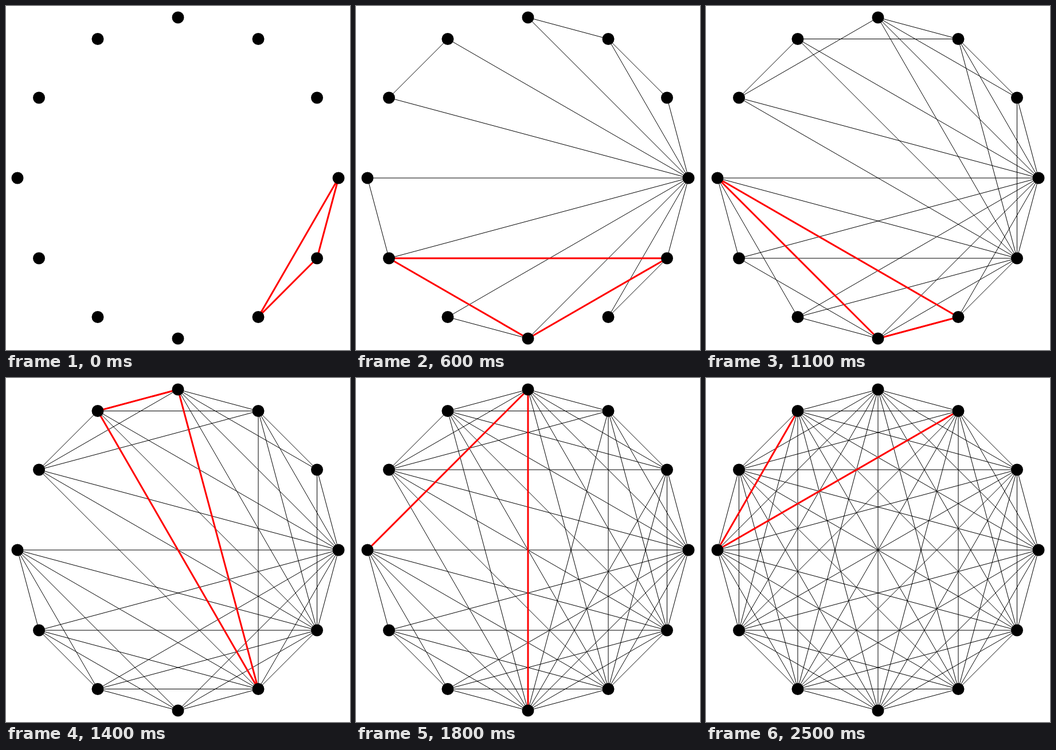
Animation, 600 px wide and 600 px high, one loop 2.6 s. Source, as an HTML page:

```html
<!DOCTYPE html>
<html lang="en">
<head>
<meta charset="utf-8">
<title>Covering the complete graph on twelve points</title>
<style>
  html, body { margin: 0; width: 100%; height: 100%; overflow: hidden; background: #fff; }
  svg { display: block; width: 100%; height: 100%; }
  path { fill: none; }
  #drawn { stroke: #000; stroke-width: 1; }
  #fresh { stroke: #f00; stroke-width: 3; }
</style>
</head>
<body>
<svg viewBox="0 0 600 600">
  <path id="drawn"/>
  <path id="fresh"/>
  <g id="dots"></g>
</svg>
<script>
const STEP = 100;
const COUNT = 12;
// Each step joins three points, written as base-12 digits.
const triples = ('012 034 056 078 09a 0ab 135 146 179 18a 19b 236 245 ' +
  '27a 289 28b 37b 38a 369 47b 48a 459 57b 58a 67b 68a').split(' ');

const points = Array.from({ length: COUNT }, (_, i) => {
  const angle = i * 2 * Math.PI / COUNT;
  return [300 + 280 * Math.cos(angle), 300 + 280 * Math.sin(angle)];
});

const segment = ([a, b]) => `M${points[a]}L${points[b]}`;

// Only edges not drawn before belong to a step.
const seen = new Set();
const steps = triples.map(triple => {
  const [a, b, c] = [...triple].map(d => parseInt(d, COUNT));
  return [[a, b], [b, c], [a, c]].filter(edge => {
    const key = edge.join('-');
    return !seen.has(key) && seen.add(key);
  }).map(segment).join('');
});

const drawn = document.getElementById('drawn');
const fresh = document.getElementById('fresh');
const dots = document.getElementById('dots');

for (const [x, y] of points) {
  const dot = document.createElementNS('http://www.w3.org/2000/svg', 'circle');
  dot.setAttribute('cx', x);
  dot.setAttribute('cy', y);
  dot.setAttribute('r', 10.5);
  dots.append(dot);
}

let shown = -1;
function render(time) {
  const n = Math.floor(time / STEP) % steps.length;
  if (n === shown) return;
  shown = n;
  drawn.setAttribute('d', steps.slice(0, n).join(''));
  fresh.setAttribute('d', steps[n]);
}

const start = performance.now();
function tick() {
  render(performance.now() - start);
  requestAnimationFrame(tick);
}
tick();
</script>
</body>
</html>
```
